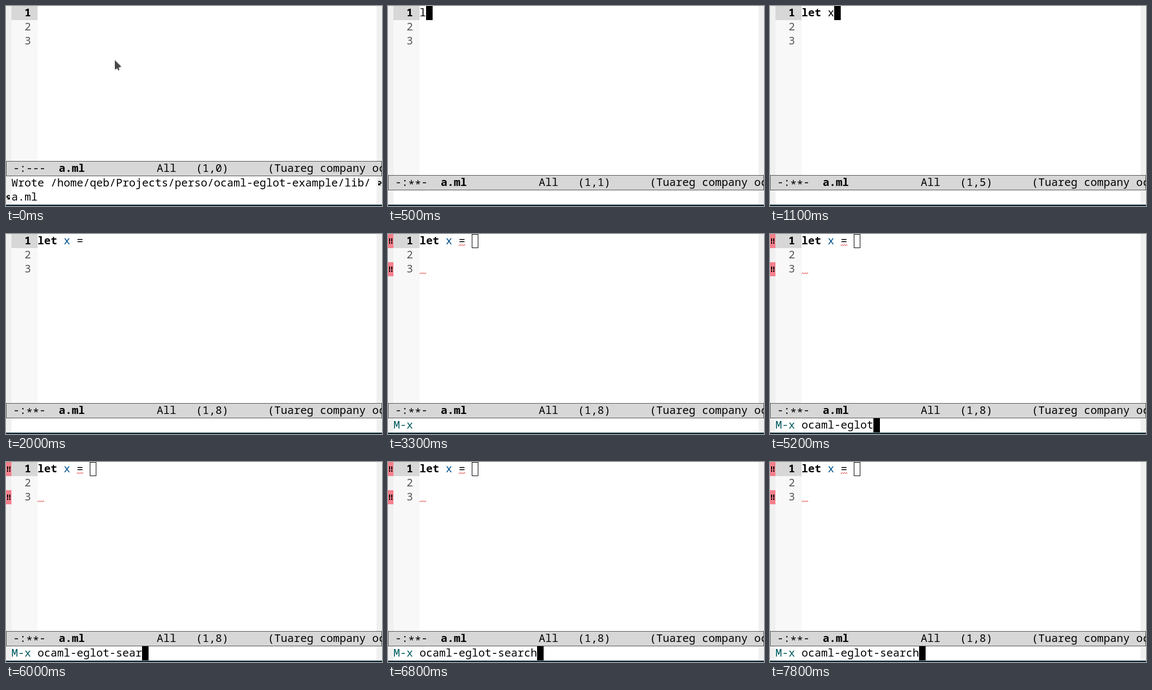
An HTML page with a canvas that plays this animation: 691x369 px, repeating every 8 s.

```html
<!DOCTYPE html>
<html lang="en">
<head>
<meta charset="utf-8">
<title>Editor session</title>
<style>
  html, body { margin: 0; width: 100%; height: 100%; overflow: hidden; background: #fff; }
  canvas { display: block; width: 691px; height: 369px; }
</style>
</head>
<body>
<canvas id="stage" width="691" height="369"></canvas>
<script>
const ctx = document.getElementById('stage').getContext('2d');
const W = 691, H = 369, CELL = 12, ROW = 26, BASE = 19;
const FRINGE = 10, TEXT_X = 58, ECHO_Y = 340, DESK_Y = 366;
const LOOP = 8000, TICK = 100, BLINK = 500;
const FONT = '20px "Noto Sans Mono", "DejaVu Sans Mono", monospace';
const INK = '#000';

// One slot per tick; an empty slot is a pause.
const recording = (start, slots) => ({ start, keys: slots.split('|') });
const code = recording(500, 'l|e||t|| |x| ||=| ');
const command = recording(4000, 'o|c||am||l||-e||g|l|o|t|-|s||e|a|||r||||||||ch');
const SAVE = -600, ERRORS = 2200, PROMPT = 2800;

const slotsUntil = ({ start, keys }, t) =>
  keys.slice(0, Math.max(0, Math.floor((t - start) / TICK) + 1));
const typed = (rec, t) => slotsUntil(rec, t).join('');
const lastKey = (rec, t) =>
  rec.start + TICK * slotsUntil(rec, t).findLastIndex(key => key);

// The cursor stays on after each key, then toggles at a fixed interval.
function cursorOn(t) {
  let last = SAVE;
  if (t >= code.start) last = lastKey(code, t);
  if (t >= PROMPT) last = PROMPT;
  if (t >= command.start) last = lastKey(command, t);
  return Math.floor((t - last) / BLINK) % 2 === 0;
}

function rect(x, y, w, h, color) {
  ctx.fillStyle = color;
  ctx.fillRect(x, y, w, h);
}

function text(str, x, y, color = INK, bold = false) {
  ctx.font = (bold ? 'bold ' : '') + FONT;
  ctx.fillStyle = color;
  ctx.fillText(str, x, y);
}

function outline(x, y, w, h, color) {
  ctx.strokeStyle = color;
  ctx.lineWidth = 1;
  ctx.strokeRect(x + 0.5, y + 0.5, w - 1, h - 1);
}

function path(d, color, lineWidth) {
  const shape = new Path2D(d);
  ctx.fillStyle = ctx.strokeStyle = color;
  if (lineWidth) {
    ctx.lineWidth = lineWidth;
    ctx.stroke(shape);
  } else {
    ctx.fill(shape);
  }
}

function background(modeY) {
  rect(0, 0, W, H, '#fff');
  rect(0, 0, FRINGE, DESK_Y, '#f0f0f0');
  rect(W - FRINGE, 0, FRINGE, DESK_Y, '#f0f0f0');
  rect(FRINGE, 0, TEXT_X - FRINGE, modeY, '#f8f8f8');
  rect(FRINGE, 0, TEXT_X - FRINGE, ROW, '#d7d7d7');
  for (let row = 0; row < 3; row++) {
    text(row + 1, 34, BASE + row * ROW, row ? '#585858' : INK, !row);
  }
  rect(0, DESK_Y, W, 1, '#86939a');
  rect(0, DESK_Y + 1, W, 2, '#07232f');
}

function modeLine(y, col) {
  const put = (str, column, drop = 0, bold = false) =>
    text(str, 13 + column * CELL, y + BASE + 1 + drop, INK, bold);
  rect(0, y, W, ROW + 2, '#d7d7d7');
  put(col ? '-:  -' : '-:---', 0);
  if (col) put('**', 2, 4);
  put('a.ml', 7, 0, true);
  put('All', 22);
  put(`(1,${col})`, 28);
  put('(Tuareg company ocaml', 39);
  outline(0, y, W, ROW + 2, '#505050');
}

function codeLine(str) {
  const put = (from, to, color, bold) =>
    text(str.slice(from, to), TEXT_X + from * CELL, BASE, color, bold);
  put(0, 3, INK, str.length >= 3);
  put(4, 5, str.includes('=') ? '#00538b' : INK);
  put(6, 7);
}

function squiggle(left, top) {
  for (let x = left; x < left + CELL; x++) {
    rect(x, top + 2 - Math.abs(x % 4 - 2), 1, 1, '#dd2a26');
  }
}

function errorMark(row) {
  const y = row * ROW;
  rect(0, y, FRINGE, ROW, '#f5808c');
  for (const x of [2, 6]) {
    rect(x, y + 8, 2, 6, INK);
    rect(x, y + 15, 2, 3, INK);
  }
}

function wrapArrow(x, y, dir) {
  ctx.save();
  ctx.translate(x, y);
  ctx.scale(dir, 1);
  path('M6 1 Q0 0 1 4 L4 5.5', INK, 2);
  path('M6 3 V8 H1 Z', INK);
  ctx.restore();
}

function pointer() {
  ctx.save();
  ctx.shadowColor = 'rgba(0, 0, 0, 0.25)';
  ctx.shadowBlur = 2;
  ctx.shadowOffsetX = ctx.shadowOffsetY = 1;
  path('M200 100 V117 L211.5 111.5 Z', '#484848');
  ctx.restore();
  path('M204 111 L207.5 118.5', '#484848', 2.5);
}

function savedMessage() {
  text('Wrote /home/qeb/Projects/perso/ocaml-eglot-example/lib/', FRINGE, ECHO_Y - ROW + BASE);
  text('a.ml', FRINGE, ECHO_Y + BASE);
  wrapArrow(W - 1, ECHO_Y - ROW + 9, -1);
  wrapArrow(1, ECHO_Y + 9, 1);
}

function draw(t) {
  const line = typed(code, t);
  const modeY = line ? 312 : 312 - ROW;
  const cursorX = TEXT_X + line.length * CELL;

  background(modeY);
  codeLine(line);
  modeLine(modeY, line.length);

  if (!line) {
    savedMessage();
    pointer();
  }
  if (t >= ERRORS) {
    errorMark(0);
    errorMark(2);
    squiggle(TEXT_X + line.indexOf('=') * CELL, BASE);
    squiggle(TEXT_X, BASE + 2 * ROW);
  }
  if (t >= PROMPT) {
    const input = typed(command, t);
    outline(cursorX, 0, CELL, ROW, INK);
    text('M-x', FRINGE, ECHO_Y + BASE, '#005a5f');
    text(input, TEXT_X, ECHO_Y + BASE);
    if (cursorOn(t)) rect(TEXT_X + input.length * CELL, ECHO_Y, CELL, ROW, INK);
  } else if (cursorOn(t)) {
    rect(cursorX, 0, CELL, ROW, INK);
  }
}

let start;
function tick(now) {
  start ??= now;
  draw((now - start) % LOOP);
  requestAnimationFrame(tick);
}
draw(0);
requestAnimationFrame(tick);
</script>
</body>
</html>
```
